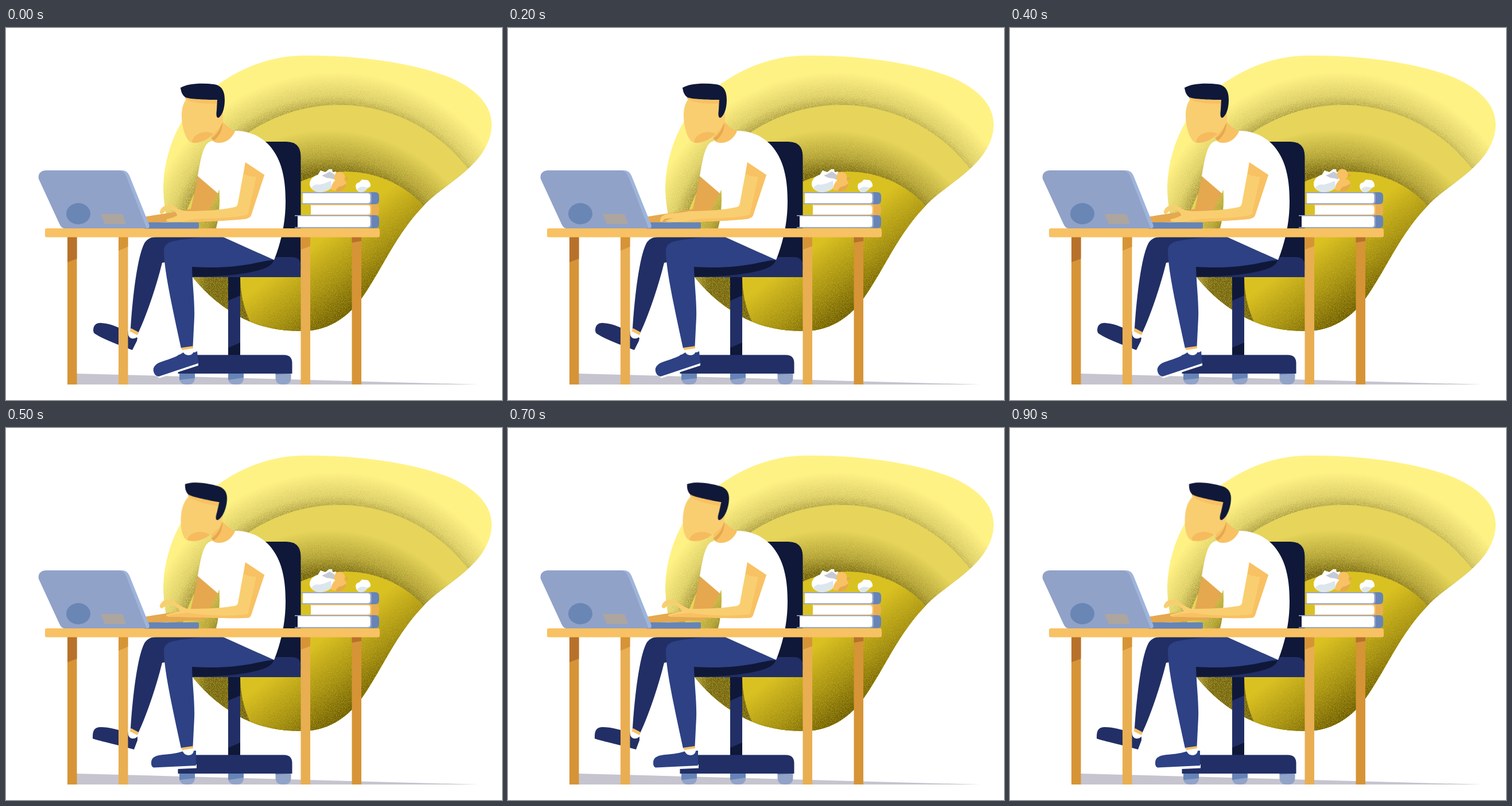
These frames come from a looping animation (864 px wide and 648 px high, 1000 ms). An HTML page:

```html
<!DOCTYPE html>
<html lang="en">
<head>
<meta charset="utf-8">
<title>Typing at the desk</title>
<style>
html, body { margin: 0; width: 100%; height: 100%; overflow: hidden; background: #fff; }
svg { position: absolute; inset: 0; width: 100%; height: 100%; display: block; }
#backdrop { will-change: transform; }

.navy { fill: #0f1838; }
.indigo { fill: #222f66; }
.blue { fill: #2d4184; }
.steel { fill: #6684b7; }
.haze { fill: #92a3c8; }
.skin { fill: #f9ce70; }
.tan { fill: #f8c163; }
.clay { fill: #e5a84f; }
.oak { fill: #e9ae52; }
.bark { fill: #d69436; }
.rust { fill: #b8712a; }
.white { fill: #fff; }

#head, #arm, #armShade, #bird, .down, .up { animation: 1s step-end infinite; }
#head { transform-origin: 345px 148px; animation-name: nod; }
#bird { animation-name: peck; }
.down { animation-name: down; }
.up { animation-name: up; }
#arm { animation-name: type; }
#armShade { animation-name: shade; }

@keyframes nod {
  0% { transform: rotate(0deg); }
  50%, 70%, 90% { transform: rotate(9.6deg); }
  60%, 80% { transform: rotate(-4.5deg); }
}
@keyframes peck {
  0%, 50% { transform: none; }
  40% { transform: translate(-2px, -5px); }
}
@keyframes down { 0% { visibility: visible; } 50%, 100% { visibility: hidden; } }
@keyframes up { 0% { visibility: hidden; } 50%, 100% { visibility: visible; } }
@keyframes type {
  0%, 40% { d: path("M417 234L450 256L427 326Q424 332 414 333C380 336 330 338 285 338Q278 337 280 333Q290 331 298 327C298 320 288 315 281 316L272 324Q267 324 268 319Q272 309 282 309C296 309 298 318 316 319C345 319 375 317 398 312Q403 311 404 305Z"); }
  0%, 20% { animation-timing-function: steps(2); }
  20% { d: path("M417 234L450 256L427 326Q424 332 414 333C380 336 330 338 285 338Q278 337 274 337Q275 334 290 331C285 332 275 331 272 333L268 338Q263 338 266 331Q270 324 282 323C296 322 298 323 316 319C345 319 375 317 398 312Q403 311 404 305Z"); }
  50%, 70%, 90%, 100% { d: path("M417 234L450 256L427 325Q424 331 414 331C380 332 330 329 285 329Q278 328 279 325Q290 322 303 319C300 312 290 306 284 306L272 314Q267 314 268 309Q272 299 282 299C296 300 300 310 316 315C345 315 375 314 398 310Q403 309 404 305Z"); }
  60%, 80% { d: path("M417 234L450 256L427 326Q424 332 418 332C390 332 345 322 308 314Q292 315 278 308Q276 305 300 306C296 300 288 294 280 294L271 301Q266 300 269 295Q274 288 289 286C300 288 302 300 316 303C345 306 375 309 398 310Q403 309 404 305Z"); }
}
@keyframes shade {
  0%, 20%, 40% { d: path("M427 326Q424 332 414 333C380 336 345 338 305 338Q320 333 345 332C375 331 410 330 427 323Z"); }
  50%, 70%, 90%, 100% { d: path("M427 325Q424 331 414 331C380 332 330 329 285 329Q276 325 318 322C350 328 410 328 427 323Z"); }
  60%, 80% { d: path("M427 326Q424 332 418 332C390 332 345 322 308 314Q296 314 314 311C350 319 400 327 427 323Z"); }
}
</style>
</head>
<body>
<svg id="backdrop" viewBox="0 0 864 648">
  <defs>
    <clipPath id="blob"><path d="M520 48C600 47 700 58 768 84C820 105 846 135 846 168C846 200 825 228 805 245C775 272 747 288 727 310C680 358 655 420 620 470C595 505 560 528 515 528C480 528 445 522 415 507C380 490 350 465 325 434C293 392 274 330 274 276C275 240 285 200 305 165C320 138 345 113 370 98C415 66 465 48 520 48Z"/></clipPath>
    <radialGradient id="outer" gradientUnits="userSpaceOnUse" cx="572" cy="417" r="340">
      <stop offset=".81" stop-color="#5a4c00" stop-opacity=".6"/>
      <stop offset=".88" stop-color="#5a4c00" stop-opacity=".24"/>
      <stop offset="1" stop-color="#5a4c00" stop-opacity="0"/>
    </radialGradient>
    <radialGradient id="middle" gradientUnits="userSpaceOnUse" cx="562" cy="463" r="285">
      <stop offset=".74" stop-color="#5a4c00" stop-opacity=".9"/>
      <stop offset=".84" stop-color="#5a4c00" stop-opacity=".42"/>
      <stop offset="1" stop-color="#5a4c00" stop-opacity="0"/>
    </radialGradient>
    <linearGradient id="inner" gradientUnits="userSpaceOnUse" x1="375" y1="500" x2="456" y2="608">
      <stop offset="0" stop-color="#5a4c00" stop-opacity="0"/>
      <stop offset=".5" stop-color="#5a4c00" stop-opacity=".45"/>
      <stop offset="1" stop-color="#5a4c00" stop-opacity="1"/>
    </linearGradient>
    <filter id="grain" filterUnits="userSpaceOnUse" x="260" y="40" width="600" height="500" color-interpolation-filters="sRGB">
      <feTurbulence type="fractalNoise" baseFrequency=".9" numOctaves="2" seed="4"/>
      <feColorMatrix values="0 0 0 0 0  0 0 0 0 0  0 0 0 0 0  1.6 0 0 0 0" result="n"/>
      <feComposite in="SourceGraphic" in2="n" operator="in"/>
    </filter>
  </defs>
  <g clip-path="url(#blob)">
    <rect x="260" y="40" width="600" height="500" fill="#fff285"/>
    <rect x="260" y="40" width="600" height="500" fill="url(#outer)" filter="url(#grain)"/>
    <circle cx="580" cy="417" r="283" fill="#e6d55a"/>
    <circle cx="580" cy="417" r="283" fill="url(#middle)" filter="url(#grain)"/>
    <circle cx="592" cy="434" r="184" fill="#dac122"/>
    <circle cx="592" cy="434" r="184" fill="url(#inner)" filter="url(#grain)"/>
  </g>
</svg>

<svg viewBox="0 0 864 648">
  <path fill="#c6c4ce" d="M123 602L823 621H123Z"/>

  <!-- chair -->
  <path class="navy" d="M440 198H488Q513.500 198 513.500 224V420H440Z"/>
  <path class="indigo" d="M323 434V420L460 399H497Q513.500 399 513.500 414V434Z"/>
  <path class="navy" d="M323 414V433H345C390 432 430 427 452 418Q466 412 467 402Z"/>
  <path class="indigo" d="M387 434H408V570H387Z"/>
  <path class="navy" d="M387 434H408V466L387 475ZM387 557L408 548V570H387Z"/>
  <g id="casters"></g>
  <path class="indigo" d="M299.500 602V569.500H484Q498.500 569.500 498.500 584V602Z"/>

  <!-- legs -->
  <path class="indigo" d="M350 364H262C253 364 246 367 241 375C228 400 220 475 217 524L230 532C245 500 262 450 272 409L277 408L300 380Z"/>
  <path class="blue" d="M275 388C275 378 282 373 293 371C308 368 326 366 345 364H378L467 404C438 406 410 421 324 416C325 450 329 478 328 505L325.500 555L305 558C295 510 275 425 275 388Z"/>

  <!-- feet -->
  <path class="indigo down" d="M152 527C152 517 158 513 167 514C185 515 199 524 213 529L229 540L228 545L220 561C200 553 165 541 153 531Z"/>
  <path class="indigo up" d="M151 538C151 526 155 521 165 521C180 521 195 526 213 530L229 538V544L223 560C200 553 165 546 151 541Z"/>
  <path class="white" d="M213 527L229 533C230 538 226 541 221 541C215 541 211 535 213 527Z"/>
  <path class="tan" d="M218 523L231 530L229 535L215 528Z"/>

  <g class="down">
    <path class="white" d="M262 606L335 582V588L267 610Z"/>
    <path class="blue" d="M257 598C255 590 262 584 272 581C288 576 300 571 309 565H329L333 563L335 584L266 607C260 606 258 602 257 598Z"/>
  </g>
  <g class="up">
    <path class="white" d="M256 590L332 586V592.500L299 594L258 593Z"/>
    <path class="blue" d="M253 583C253 573 262 570 275 569C288 568 300 566 309 563L331 562V588L257 591.500C254 590 253 588 253 583Z"/>
  </g>
  <path class="white" d="M307 560L327 558C328 566 324 570 318 570C312 570 308 566 307 560Z"/>
  <path class="tan" d="M305 557L326 554V558L307 561Z"/>

  <!-- body -->
  <path class="clay" d="M335 257L322 315L298 320L240 329V339C270 340 310 336 343 334Q348 332 350 326L369 288Z"/>
  <path class="white" d="M399 179C430 179 455 195 468 217C484 242 487 275 487 302C487 340 479 374 467 404L378 364H366V349C371 330 373 306 371.500 281L369 288L334 258C339 230 343 200 358 197Z"/>
  <path class="tan" d="M377 163Q386 174 399 180C393 193 382 201 369 200Q360 199 357 192L362 170Z"/>
  <path class="clay" d="M358 192C366 187 373 178 375 167L377 165C377 178 372 188 362 196Z"/>

  <g id="head">
    <path class="skin" d="M306 152C306 138 310 128 317 120L368 122L378 140V163C372 176 359 190 346 196C338 201 328 201 322 199C311 193 306 168 306 152Z"/>
    <path class="tan" d="M312 119L368 124V132C350 132 326 132 312 123Z"/>
    <path fill="#f5bb5e" d="M327 191C334 181 352 179 361 184C353 193 342 200 325 200Q323 196 327 191Z"/>
    <path class="navy" d="M304 104C315 97 340 95 362 98C376 100 381 110 381 125C381 138 378 150 371 156C366 158 366 150 367 143L368 125C345 125 322 124 313 121C307 117 305 111 304 104Z"/>
  </g>

  <!-- desk -->
  <g id="posts"></g>
  <rect class="tan" x="68" y="349" width="583" height="15.500" rx="3"/>

  <!-- laptop -->
  <rect class="steel" x="240" y="338.500" width="96" height="11" rx="2"/>
  <path fill="#9fb4db" d="M190 248H202Q211 248 215 257L249.500 343Q251 349 245 349H230Z"/>
  <path fill="#90a2c8" d="M57 263C55 254 61 248 70 248H195Q205 248 209 257L245 349H101Q96 348 93 341Z"/>
  <ellipse cx="126" cy="323.500" rx="21" ry="18.500" fill="#6a86b4"/>
  <path fill="#ada5a0" d="M165 324H203L209 341.500H172Z"/>

  <!-- near arm -->
  <path id="arm" class="skin"/>
  <path class="tan" d="M417 234L450 256L427 326Q425 331 420 331L436 259Q422 259 414 254Z"/>
  <path id="armShade" class="tan"/>

  <!-- books -->
  <g id="books"></g>

  <!-- paper balls and bird -->
  <path class="white" d="M529 274C528 264 536 257 543 256L548 248L556 251L563 246L568 246L569 251L575 250L574 266L567 278Q560 286 545 286Q532 284 529 274Z"/>
  <path fill="#c6cad4" d="M550 257L558 261L566 262L572 264L572 255L564 250L557 254Z"/>
  <path fill="#dce6ec" d="M532 278Q538 271 546 273L557 270L566 266L567 278Q560 286 545 286Q534 284 532 278Z"/>
  <path class="tan" d="M566 282C567 272 571 264 580 263Q593 262 593 273Q589 284 575 284Z"/>
  <path class="clay" d="M574 284Q577 276 586 275L593 271Q592 282 580 285Z"/>
  <g id="bird">
    <path class="clay" d="M587 260H596V264H587Z"/>
    <circle class="tan" cx="581" cy="260" r="9.500"/>
  </g>
  <path class="white" d="M609 276Q609 270 615 269L620 264L630 265Q636 270 635 276L629 280Q625 286 617 286Q610 284 609 276Z"/>
  <path fill="#dce6ec" d="M611 281Q619 274 628 278L634 276L629 280Q625 286 617 286Z"/>
</svg>

<script>
const put = (id, html) => { document.getElementById(id).innerHTML = html; };

// x, left and right height of the slanted shadow, shadow class, wood class
const posts = [
  [107, 408, 402, 'rust', 'bark'], [196, 388, 381, 'bark', 'oak'],
  [513.5, 386, 380, 'bark', 'oak'], [602.5, 374, 371, 'rust', 'bark']
];
put('posts', posts.map(([x, a, b, dark, wood]) =>
  `<path class="${wood}" d="M${x} 362h16.500V621h-16.500Z"/>
   <path class="${dark}" d="M${x} 362h16.500V${b}L${x} ${a}Z"/>`).join(''));

const casters = [[302, 613, 610], [387, 613, 609], [469.5, 604, 602]];
put('casters', casters.map(([x, a, b]) =>
  `<path class="haze" d="M${x} 600h27v9q0 12 -12 12h-3q-12 0 -12 -12Z"/>
   <path class="steel" d="M${x} 600h27V${b}L${x} ${a}Z"/>`).join(''));

// x, y, height, page inset, cover class, spine class
const books = [
  [514, 286, 21, 3, 'haze', 'steel'], [530, 307, 19.5, 1, 'tan', 'oak'], [503, 326, 22.5, 5, 'haze', 'steel']
];
put('books', books.map(([x, y, h, inset, cover, spine]) =>
  `<path class="${spine}" d="M632 ${y}h11q7 0 7 7v${h - 14}q0 7 -7 7h-11Z"/>
   <path class="${cover}" d="M${x} ${y}H632q5 0 5 5v${h - 10}q0 5 -5 5H${x}v-1.700h${inset}V${y + 1.7}H${x}Z"/>
   <path class="white" d="M${x + inset} ${y + 1.7}H630q4.500 0 4.500 4.500v${h - 12.4}q0 4.500 -4.500 4.500H${x + inset}Z"/>`).join(''));
</script>
</body>
</html>
```
